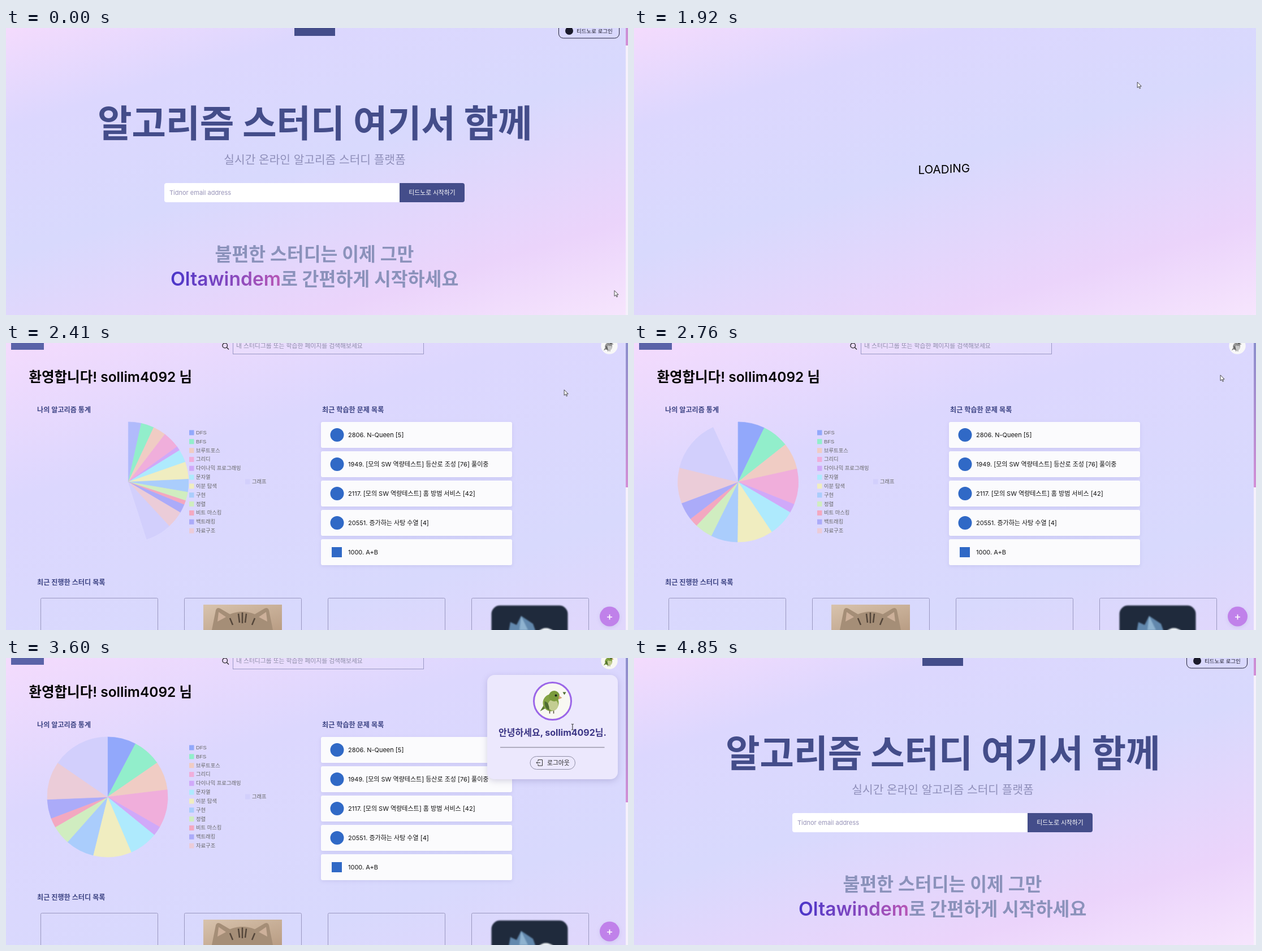
An HTML page that plays this animation: 1100 px wide and 509 px high, repeating every 5180 ms.

```html
<!DOCTYPE html>
<html lang="ko">
<head>
<meta charset="utf-8">
<title>알고리즘 스터디</title>
<style>
html, body { margin: 0; width: 100%; height: 100%; overflow: hidden; }
:root { --sky: linear-gradient(163deg, #f4dbfd, #dcd7fe 21%, #d8d9fd 48%, #ebd4fb 80%, #f6e5fd); }
svg { position: absolute; left: 0; top: 0; width: 1100px; height: 509px; background: var(--sky);
  font-family: Inter, "Noto Sans CJK KR", "Noto Sans CJK JP", "Noto Sans CJK", sans-serif; }
#dashboard { background-size: 1100px 1010px; }
#crash { background-size: 1100px 237px; background-position: 0 -19px; }
#overlay { background: none; }
.mid { text-anchor: middle; }
.bold { font-weight: 700; }
.section { font-size: 12.1px; font-weight: 600; fill: #3d4484; }
.legend { font: 9.3px "Liberation Sans", "Noto Sans CJK KR", "Noto Sans CJK JP", sans-serif; fill: #666; }
.mono text { font: 10.58px "Noto Sans Mono", monospace; white-space: pre; }
.soft { filter: drop-shadow(0 2px 3px #5a50a020); }
.blurred { filter: blur(1.3px); }
</style>
</head>
<body>
<svg id="landing">
  <rect x="510" y="-58" width="72" height="72" fill="#444d8a"/>
  <rect id="login" x="977.5" y="-8" width="107" height="26" rx="8" fill="#fff" stroke="#23233a"/>
  <circle cx="996" cy="5" r="7" fill="#1b1b2b"/>
  <text x="1009" y="8.500" font-size="9.5" fill="#1b1b2b">티드노로 로그인</text>
  <text class="mid bold" x="546" y="193" font-size="66" letter-spacing="-.5" fill="#444d8a">알고리즘 스터디 여기서 함께</text>
  <text class="mid" x="546" y="240.500" font-size="20.3" fill="#8f8fba">실시간 온라인 알고리즘 스터디 플랫폼</text>
  <rect x="280" y="275" width="440" height="34" rx="4" fill="#fff"/>
  <path d="M696 275h111a4 4 0 0 1 4 4v26a4 4 0 0 1-4 4H696z" fill="#444d8a"/>
  <text x="289" y="296" font-size="11" fill="#9793b8">Tidnor email address</text>
  <text class="mid" x="753.500" y="296" font-size="10.8" font-weight="500" fill="#fff">티드노로 시작하기</text>
  <g class="bold" font-size="32.5" fill="#8b92bb">
    <text class="mid" x="545.500" y="413">불편한 스터디는 이제 그만</text>
    <text x="486" y="456.500">로 간편하게 시작하세요</text>
    <text x="486" y="456.500" text-anchor="end" font-size="33.6" font-weight="600" fill="url(#brand)">Oltawindem</text>
  </g>
  <rect x="1096" width="4" height="509" fill="#f5f0fb"/>
  <rect x="1096" y="-220" width="4" height="251" fill="url(#thumb)"/>
</svg>

<svg id="loading"><text id="wave" x="502.500" y="256.500" font-size="20.6">LOADING</text></svg>

<svg id="dashboard">
  <rect x="9" y="-46" width="58" height="58" fill="#5a63a8"/>
  <path d="M390.500 8l3.500 3.500M391.500 4.500a4.300 4.300 0 1 1-8.600 0a4.300 4.300 0 1 1 8.600 0" fill="none" stroke="#222" stroke-width="1.3"/>
  <rect x="401.500" y="-12" width="337" height="31.500" fill="#fff1" stroke="#9a98c4"/>
  <text x="407" y="9" font-size="10.8" fill="#8f8fa8">내 스터디그룹 또는 학습한 페이지를 검색해보세요</text>
  <use id="avatar" href="#bird" transform="translate(1067 5) scale(.46)"/>
  <text x="40.500" y="69" font-size="24.5" font-weight="600">환영합니다! sollim4092 님</text>
  <text class="section" x="55" y="122.500">나의 알고리즘 통계</text>
  <text class="section" x="559" y="122.500">최근 학습한 문제 목록</text>
  <text class="section" x="55" y="428.500">최근 진행한 스터디 목록</text>
  <g id="pie"></g>
  <g id="legend" class="legend"></g>
  <g id="problems" class="soft"></g>
  <g id="studies"></g>
  <rect x="349" y="464" width="139" height="45" fill="url(#fur)"/>
  <path d="M364 509l7-35q2-6 8-3l17 10q22-9 44 0l17-10q6-3 8 3l7 35z" fill="#a58e77"/>
  <path d="M374 494l2-17 13 9zM462 494l-2-17-13 9z" fill="#cdb09a"/>
  <path d="M411 480l2 16M418 478v19M425 480l-2 16M396 488l5 12M440 488l-5 12" stroke="#54463a" stroke-width="2.500"/>
  <g class="blurred">
    <rect x="858.500" y="465.500" width="135" height="70" rx="15" fill="#1f2a3c"/>
    <path d="M889 512l3-17 11 5 8-16 21 14 5 14z" fill="#6288ad"/>
    <path d="M908 509l3-25 12 25z" fill="#8fb3d0"/>
    <path d="M942 511q12-11 27 0z" fill="#eef2f6"/>
  </g>
  <g class="soft">
    <circle cx="1067.500" cy="485" r="17.500" fill="#c081ea"/>
    <path d="M1063 486h9M1067.500 481.500v9" stroke="#fff" stroke-width="1.7"/>
  </g>
  <rect x="1096" width="4" height="509" fill="#f5f0fb"/>
  <rect x="1096" y="-20" width="4" height="276" fill="url(#thumb)"/>
  <g id="profile">
    <rect x="851" y="30" width="231" height="185" rx="13" fill="#ece8fd" style="filter:drop-shadow(0 3px 6px #4a408038)"/>
    <use href="#bird" x="966.500" y="76.500"/>
    <circle cx="966.500" cy="76.500" r="33" fill="none" stroke="#9b66e8" stroke-width="3"/>
    <text class="mid bold" x="966.500" y="137.500" font-size="16" fill="#3b3585">안녕하세요, sollim4092님.</text>
    <path d="M874 158.500h184.500" stroke="#9b99aa" stroke-width="1.700"/>
    <rect x="927" y="174.500" width="79.500" height="23" rx="11.500" fill="none" stroke="#8f8ea6"/>
    <path d="M941 183v-2.500h7.500v10.500h-7.500v-2.500M945 185.700h-7m2-2l-2 2 2 2" fill="none" stroke="#333"/>
    <text x="957" y="189.500" font-size="10.8" fill="#222">로그아웃</text>
  </g>
</svg>

<svg id="crash">
  <text x="-4" y="11" font-size="11.25" font-style="italic">Cannot read properties of null (reading 'nickname')</text>
  <rect y="16" width="1100" height="202" fill="#c8c8c8" fill-opacity=".5"/>
  <g id="trace" class="mono"></g>
</svg>

<svg id="overlay">
  <defs>
    <linearGradient id="brand"><stop stop-color="#4a36c9"/><stop offset="1" stop-color="#b757b6"/></linearGradient>
    <linearGradient id="thumb" x2="0" y2="1"><stop stop-color="#868fcb"/><stop offset="1" stop-color="#d38fd6"/></linearGradient>
    <linearGradient id="fur" x2="1" y2="1"><stop stop-color="#d8c3ad"/><stop offset="1" stop-color="#b99d84"/></linearGradient>
    <g id="bird">
      <circle r="32" fill="#f8f8f2"/>
      <path d="M-22 18L-10-2-4 8z" fill="#5d7a35"/>
      <ellipse cx="-3" cy="3" rx="14" ry="15" fill="#84a344"/>
      <ellipse cx="1" cy="7" rx="9" ry="10" fill="#c3cd92"/>
      <circle cx="3" cy="-9" r="9.5" fill="#7b9b3d"/>
      <path d="M11-10l6 4-6 3z" fill="#d8a276"/>
      <circle cx="6" cy="-10" r="2" fill="#1c221a"/>
      <path d="M-14 0q9 3 8 16-9-3-8-16M18-16l3 5 3-5" fill="#4f6b31"/>
      <path d="M-5 17v5M2 17v5" stroke="#544c38" stroke-width="1.5"/>
    </g>
  </defs>
  <g id="cursor">
    <path id="arrow" d="M0 0v10l2.300-2.200 1.700 3.700 1.500-.7-1.600-3.500h3.200z" fill="#fff" stroke="#222" stroke-width=".8"/>
    <path id="beam" d="M-2 0h1.500l.5.500.5-.5H2M0 .5v9M-2 10h1.500l.5-.5.5.5H2" fill="none" stroke="#222"/>
  </g>
</svg>

<script>
const LOOP = 5180;
const $ = id => document.getElementById(id);
const show = (id, on) => { $(id).style.display = on ? '' : 'none'; };
const clamp = v => Math.max(0, Math.min(1, v));

const topics = [
  ['DFS', 3, '#92a8fb'], ['BFS', 3, '#92eecb'], ['브루트포스', 3, '#f0ccc4'], ['그리디', 4, '#f0aedb'],
  ['다이나믹 프로그래밍', 1, '#d0a9f9'], ['문자열', 3, '#aeeafd'], ['이분 탐색', 4, '#f0edc0'],
  ['구현', 3, '#aacdfc'], ['정렬', 2, '#d0edc0'], ['비트 마스킹', 1, '#f3a8c0'],
  ['백트래킹', 2, '#ababf9'], ['자료구조', 4, '#ebccd8'], ['그래프', 6, '#d2cffc']
];
const total = topics.reduce((sum, topic) => sum + topic[1], 0);

$('pie').innerHTML = topics.map(([, , color]) =>
  `<path fill="${color}" stroke="${color}" stroke-width=".7"/>`).join('');

$('legend').innerHTML = topics.map(([name, , color], i) => {
  const [x, y] = i < 12 ? [324, 159 + 15.82 * i] : [423, 246];
  return `<rect x="${x}" y="${y - 4.5}" width="8.500" height="9" fill="${color}"/>
    <text x="${x + 12}" y="${y + 3}">${name}</text>`;
}).join('');

$('problems').innerHTML = [
  '2806. N-Queen [5]', '1949. [모의 SW 역량테스트] 등산로 조성 [76] 풀이중',
  '2117. [모의 SW 역량테스트] 홈 방범 서비스 [42]', '20551. 증가하는 사탕 수열 [4]', '1000. A+B'
].map((title, i) => {
  const y = 163 + 52 * i;
  const mark = i < 4 ? `<circle cx="585.500" cy="${y}" r="12" fill="#3069c6"/>`
    : `<rect x="576" y="${y - 9}" width="18" height="18" fill="#3069c6"/>`;
  return `<rect x="557" y="${y - 23}" width="338" height="46" rx="3" fill="#fbfbfd"/>${mark}
    <text x="605" y="${y + 4}" font-size="11" fill="#111">${title}</text>`;
}).join('');

$('studies').innerHTML = [0, 1, 2, 3].map(i =>
  `<rect x="${61.5 + 254 * i}" y="452.500" width="207" height="90" rx="2" fill="none" stroke="#9a98c0"/>`).join('');

const calls = ['Fee 285:2002', 'Ck 38:17018', 'LS 40:3139', 'VP 40:44833', 'jP 40:39790', 'Gz 40:39718',
  'Pv 40:39570', 'zS 40:35934', 'xM 40:36738', 'tl 38:3279'].map(call => {
  const [name, position] = call.split(' ');
  return `    at ${name} (https://k10d205.p.ssafy.io/assets/index-DT8xNjxR.js:${position})`;
});
$('trace').innerHTML = ["TypeError: Cannot read properties of null (reading 'nickname')", ...calls]
  .map((line, i) => `<text x=".7" y="${34 + 17.32 * i}">${line}</text>`).join('');

// Pointer stops: time, x, y
const stops = [
  [0, 1076, 466], [70, 1074, 440], [550, 1035, 6], [620, 1035, 6], [1090, 836, 104], [1420, 836, 104],
  [1920, 890, 96], [2410, 987, 83], [2760, 1037, 57], [3040, 1057, 21], [3110, 1055, 24],
  [3600, 1002, 117], [3850, 975, 186], [4090, 985, 188], [4160, 981, 181], [4360, 981, 181], [4850, 1070, 490]
];
function pointerAt(t) {
  const next = stops.findIndex(stop => stop[0] > t);
  if (next < 0) return stops[stops.length - 1].slice(1);
  const [t0, x0, y0] = stops[next - 1], [t1, x1, y1] = stops[next];
  const k = (t - t0) / (t1 - t0);
  return [x0 + (x1 - x0) * k, y0 + (y1 - y0) * k];
}

function drawPie(t) {
  const grown = 1 - (1 - clamp((t - 2272) / 1000)) ** 4;
  const cx = 246.5 - 67 * grown, cy = 246.5, r = 106.5;
  const rim = a => `${cx + r * Math.sin(a)} ${cy - r * Math.cos(a)}`;
  let angle = 0;
  topics.forEach(([, count], i) => {
    const end = angle + 2 * Math.PI * count / total * grown;
    $('pie').children[i].setAttribute('d', `M${cx} ${cy}L${rim(angle)}A${r} ${r} 0 0 1 ${rim(end)}z`);
    angle = end;
  });
  $('pie').firstChild.setAttribute('opacity', clamp(.15 + grown));
  show('pie', grown > 0);
}

function drawWave(t) {
  const lift = i => 2.5 * Math.cos(.4 + .25 * i + (t - 1920) / 200);
  $('wave').setAttribute('dy', [...'LOADING'].map((_, i) => i ? lift(i) - lift(i - 1) : lift(0)).join(' '));
}

function render(t) {
  const scene = t < 1490 ? 'landing' : t < 2200 ? 'loading' : t < 3990 ? 'dashboard' : t < 4160 ? 'crash' : 'landing';
  for (const id of ['landing', 'loading', 'dashboard', 'crash']) show(id, id === scene);

  const [x, y] = pointerAt(t);
  const overText = t > 3520 && t < 3700;
  $('cursor').setAttribute('transform', `translate(${x} ${y})`);
  show('cursor', t < 4850);
  show('arrow', !overText);
  show('beam', overText);

  $('login').setAttribute('fill-opacity', x > 977 && y < 18 ? .4 : 0);
  drawWave(t);
  drawPie(t);
  const opened = clamp((t - 3100) / 140);
  $('profile').setAttribute('opacity', opened);
  $('avatar').style.filter = `grayscale(${1 - opened})`;
}

function tick() {
  render(performance.now() % LOOP);
  requestAnimationFrame(tick);
}
tick();
</script>
</body>
</html>
```
